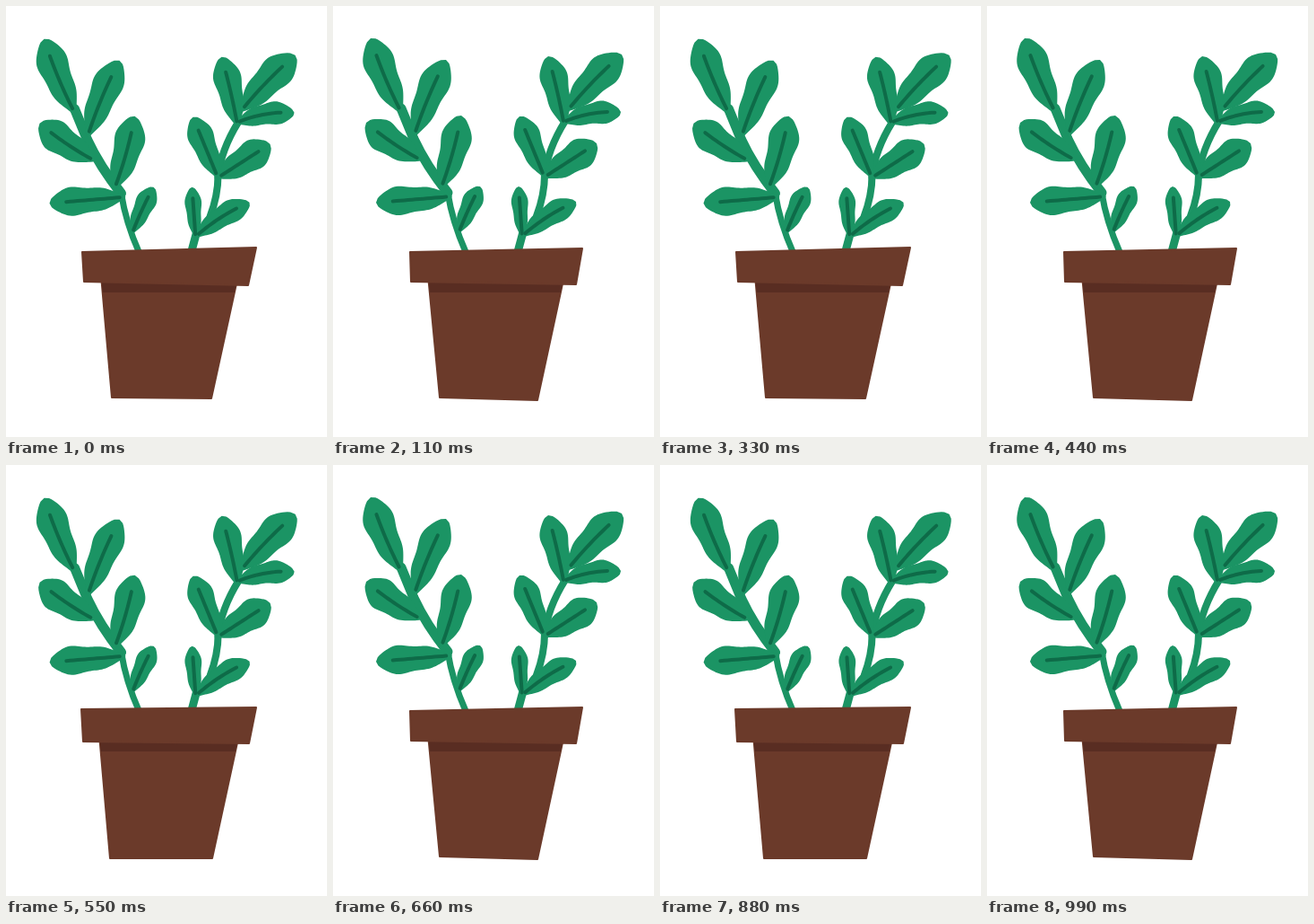
An HTML page with a canvas that plays this animation: 358 px wide and 480 px high, repeating every 1.1 s.

```html
<!DOCTYPE html>
<html lang="en">
<head>
<meta charset="utf-8">
<title>Potted plant</title>
<style>
html, body { margin: 0; height: 100%; overflow: hidden; background: #fff; }
canvas { display: block; width: 358px; height: 480px; }
</style>
</head>
<body>
<canvas id="stage" width="358" height="480"></canvas>
<script>
const ctx = document.getElementById('stage').getContext('2d');
const GREEN = '#1b9464', VEIN = '#0e6b48', BROWN = '#6b3a2a', SHADE = '#592d22';
const STEP = 110;
const LAST = 5;

// Base, tip, half width and sideways bend of each leaf
const leaves = [
  [77, 120, 42, 36, 17, -2],
  [90, 146, 126, 60, 16.5, -2],
  [99, 172, 37, 130, 17, -2],
  [120, 204, 143, 122, 16.5, 2],
  [133, 212, 48, 219, 15.5, 0],
  [140, 253, 164, 201, 11, -1],
  [258, 134, 240, 56, 15, 1],
  [261, 117, 322, 54, 17.5, -2],
  [255, 130, 321, 118, 12.5, -4],
  [236, 191, 208, 123, 14, 0],
  [235, 191, 294, 153, 16.5, 0],
  [211, 258, 207, 201, 9, 0],
  [210, 257, 271, 218, 12.5, -3]
];

const stems = [
  ['M76 114L90 148Q104 178 128 208', 11],
  ['M128 208Q133 240 148 274', 7],
  ['M259 128Q239 160 236 190', 8],
  ['M236 188Q236 210 227 234', 8],
  ['M213 248L206 274', 9]
].map(([d, width]) => [new Path2D(d), width]);

// The three redrawn poses: plant shift and pot corners
const poses = [
  { shift: [0.5, 0.7], rim: 'M85 274L279 269L270 311L87 307Z', body: 'M106 300L118 436L229 437L259 300Z' },
  { shift: [0, 0], rim: 'M86 274L278 270L271 310L87 307Z', body: 'M106 300L119 436L228 439L258 300Z' },
  { shift: [0.6, 0.7], rim: 'M84 272L279 270L271 310L86 308Z', body: 'M104 300L116 438L230 438L260 300Z' }
].map(p => ({ shift: p.shift, rim: new Path2D(p.rim), body: new Path2D(p.body) }));

function line(path, color, width) {
  ctx.strokeStyle = color;
  ctx.lineWidth = width;
  ctx.stroke(path);
}

function shape(path, color) {
  ctx.fillStyle = color;
  ctx.fill(path);
  line(path, color, 2);
}

// Point at t along the leaf, off to one side of its spine
function along([x, y, tipX, tipY, , bend], t, side = 0) {
  const dx = tipX - x, dy = tipY - y, len = Math.hypot(dx, dy);
  const off = side + bend * 4 * t * (1 - t);
  return [x + dx * t - dy / len * off, y + dy * t + dx / len * off];
}

// Narrow base, round tip and a slight waist
function halfWidth(width, t) {
  const lobes = 1 + 0.09 * Math.cos(4 * Math.PI * (t - 0.75));
  return width * lobes * Math.sqrt(Math.max(0, Math.sin(Math.PI * t ** 1.4)));
}

function outline(leaf) {
  const path = new Path2D(), n = 40;
  for (let i = 0; i < 2 * n; i++) {
    const t = 1 - Math.abs(1 - i / n);
    const side = i < n ? 1 : -1;
    path.lineTo(...along(leaf, t, side * halfWidth(leaf[4], t)));
  }
  path.closePath();
  return path;
}

function vein(leaf) {
  const path = new Path2D();
  for (let t = 0.08; t < 0.8; t += 0.05) path.lineTo(...along(leaf, t));
  return path;
}

const blades = leaves.map(outline), veins = leaves.map(vein);

function draw({ shift, rim, body }) {
  ctx.fillStyle = '#fff';
  ctx.fillRect(0, 0, 358, 480);
  ctx.lineCap = ctx.lineJoin = 'round';

  ctx.save();
  ctx.translate(...shift);
  stems.forEach(([path, width]) => line(path, GREEN, width));
  blades.forEach(path => { ctx.fillStyle = GREEN; ctx.fill(path); });
  veins.forEach(path => line(path, VEIN, 4));
  ctx.restore();

  shape(body, BROWN);
  ctx.save();
  ctx.clip(body);
  ctx.fillStyle = SHADE;
  ctx.fillRect(0, 300, 358, 19);
  ctx.restore();
  shape(rim, BROWN);
}

const start = performance.now();
function tick() {
  // Two rounds of the poses forward, then the same way back
  const step = Math.floor((performance.now() - start) / STEP) % (2 * LAST);
  draw(poses[(LAST - Math.abs(LAST - step)) % poses.length]);
  requestAnimationFrame(tick);
}
tick();
</script>
</body>
</html>
```
